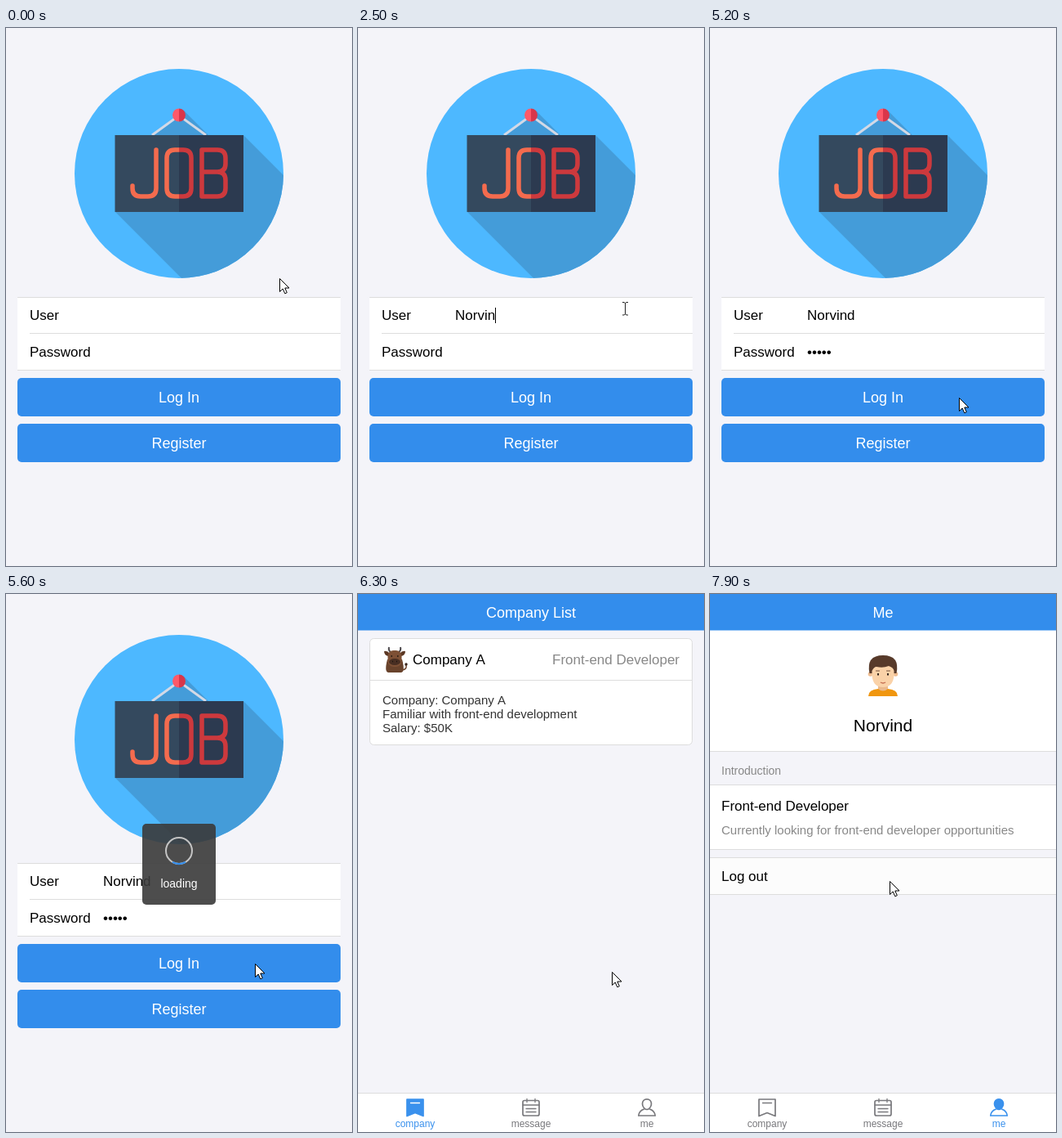
Write an HTML page that moves like this. It is 424 px wide and 658 px high and loops after 8 s.

```html
<!DOCTYPE html>
<html lang="en">
<head>
<meta charset="utf-8">
<title>Job app</title>
<style>
html, body { margin: 0; width: 100%; height: 100%; overflow: hidden; background: #f4f4f9; }
svg { display: block; width: 424px; height: 658px; font: 17px "Liberation Sans", Arial, sans-serif; font-kerning: none; }
.mid { text-anchor: middle; }
.end { text-anchor: end; }
.white { fill: #fff; }
.grey { fill: #888; }
.big { font-size: 18px; }
.body { font-size: 15px; }
.line { stroke: #ddd; fill: none; }
.blue { fill: #338dec; }
.tab { font-size: 12px; color: #78787c; }
.tab text { fill: currentColor; }
.tab path { stroke: currentColor; stroke-width: 1.7; fill: none; stroke-linejoin: round; stroke-linecap: round; }
.tab .thin { stroke-width: 1.3; }
.tab.on { color: #3a91ed; }
.tab.on .solid { fill: currentColor; }
.tab.on .mark { stroke: #fff; }
</style>
</head>
<body>
<svg viewBox="0 0 424 658">
  <defs>
    <clipPath id="disc"><circle cx="212" cy="178" r="128"/></clipPath>
  </defs>

  <g id="login">
    <g clip-path="url(#disc)">
      <rect x="84" y="50" width="256" height="256" fill="#4db8ff"/>
      <path fill="#449cd9" d="M291 131L350 190L300 320H229L134 225Z M218 101L248 131H181L212 109Z"/>
    </g>
    <path d="M179 131L212 107L245 131" fill="none" stroke="#d3d9e6" stroke-width="3"/>
    <rect x="133.500" y="131" width="157.500" height="94" fill="url(#board)"/>
    <circle cx="212" cy="106.500" r="8" fill="url(#pin)"/>
    <path fill="none" stroke="url(#ink)" stroke-width="5.500" stroke-linecap="round" stroke-linejoin="round"
      d="M184 149V196Q184 206 174 206H165Q155 206 155 196V193
         M207 149H217Q227 149 227 159V196Q227 206 217 206H207Q197 206 197 196V159Q197 149 207 149Z
         M240 176V149H259Q269 149 269 159V166Q269 176 259 176H240V206H259Q269 206 269 196V186Q269 176 259 176"/>
    <rect class="white" x="14" y="329" width="396" height="90"/>
    <path class="line" d="M14 329.500H410M29 373.500H410M14 418.500H410"/>
    <text x="29" y="357">User</text>
    <text x="29" y="402">Password</text>
    <text id="user" x="119" y="357"></text>
    <text id="pass" x="119" y="402"></text>
    <path id="caret" d="M.5 0V19" stroke="#000"/>
    <rect id="submit" class="blue" x="14" y="428" width="396" height="47" rx="5"/>
    <rect class="blue" x="14" y="484" width="396" height="47" rx="5"/>
    <text class="mid white big" x="212" y="458">Log In</text>
    <text class="mid white big" x="212" y="514">Register</text>
    <g id="toast">
      <rect x="167" y="281" width="90" height="99" rx="5" fill="#3a3a3a" opacity=".9"/>
      <circle cx="212" cy="314" r="16" fill="none" stroke="#c4c4c4" stroke-width="2"/>
      <path id="spin" d="M204 327.860A16 16 0 0 0 220 327.860" fill="none" stroke="#338dec" stroke-width="2.200"/>
      <text class="mid white" x="212" y="359" font-size="14">loading</text>
    </g>
  </g>

  <g id="company">
    <rect class="line" x="14.500" y="54.500" width="395" height="130" rx="5" style="fill:#fff"/>
    <path class="line" d="M15 105.500H409"/>
    <path d="M54 93Q61 92 58.500 86" fill="none" stroke="#6b432c" stroke-width="1.500"/>
    <circle cx="59" cy="86" r="1.700" fill="#38251b"/>
    <path d="M40 71Q37 69 38 65M50 71Q53 69 52 65" fill="none" stroke="#49464a" stroke-width="2"/>
    <path d="M32 70Q36 69 39 73L37 76Q32 75 32 70M58 70Q54 69 51 73L53 76Q58 75 58 70" fill="#5c3824"/>
    <path d="M36 80Q32 95 37 96H53Q58 95 54 80Z" fill="#69432c"/>
    <rect x="36.500" y="69" width="17" height="20" rx="7" fill="#7d5035"/>
    <ellipse cx="45" cy="83" rx="7" ry="4" fill="#482e22"/>
    <path d="M40.500 76h1.500M48 76h1.500M42 82.500h1M47 82.500h1" stroke="#17110d" stroke-width="1.500"/>
    <text x="67" y="86">Company A</text>
    <text class="end grey" x="394" y="86">Front-end Developer</text>
    <g class="body" fill="#333">
      <text x="30" y="135">Company: Company A</text>
      <text x="30" y="152">Familiar with front-end development</text>
      <text x="30" y="169">Salary: $50K</text>
    </g>
  </g>

  <g id="me">
    <path class="white" d="M0 44H424V192H0ZM0 233H424V312H0Z"/>
    <path fill="#fcfcfc" d="M0 322H424V367H0Z"/>
    <path class="line" d="M0 192.500H424M0 233.500H424M0 312.500H424M0 322.500H424M0 367.500H424"/>
    <path d="M194 125Q194 117 206 116H218Q230 117 230 125Z" fill="#f0960f"/>
    <path d="M206 108H218V116Q212 121 206 116Z" fill="#eab98c"/>
    <circle cx="196.500" cy="98" r="2.800" fill="#efbd91"/>
    <circle cx="227.500" cy="98" r="2.800" fill="#efbd91"/>
    <path d="M195.500 97Q191 75 212 75Q233 75 228.500 97Z" fill="#573a2a"/>
    <path d="M198.500 94Q201 89 204 89Q212 91 219 88Q225 90 225.500 94V100Q224 114 212 114Q200 114 198.500 100Z" fill="#fad2a8"/>
    <path d="M203 94h5M216 94h5" stroke="#7a5840"/>
    <path d="M206 97v2.500M218 97v2.500" stroke="#3a2920" stroke-width="2"/>
    <path d="M209 108Q212 110 215 108" fill="none" stroke="#c2694c" stroke-width="1.300"/>
    <text class="mid" x="212" y="168" font-size="21">Norvind</text>
    <text class="grey" x="14" y="221" font-size="14">Introduction</text>
    <text x="14" y="265">Front-end Developer</text>
    <text class="grey body" x="14" y="294">Currently looking for front-end developer opportunities</text>
    <text x="14" y="351">Log out</text>
  </g>

  <g id="frame">
    <rect class="blue" width="424" height="44.500"/>
    <text id="title" class="mid white big" x="212" y="29"></text>
    <rect class="white" y="610" width="424" height="48"/>
    <path class="line" d="M0 610.500H424"/>
    <g class="tab" id="tabCompany">
      <path class="solid" d="M60 618H80V638.500L70 634.500L60 638.500Z"/>
      <path class="mark thin" d="M64.500 622.500H75.500"/>
      <text class="mid" x="70" y="652">company</text>
    </g>
    <g class="tab">
      <path d="M204 619.500H220Q222 619.500 222 621.500V636Q222 638 220 638H204Q202 638 202 636V621.500Q202 619.500 204 619.500Z"/>
      <path class="thin" d="M202 625H222M207 617.500V621.500M217 617.500V621.500M206 629.500H218M206 633.500H218"/>
      <text class="mid" x="212" y="652">message</text>
    </g>
    <g class="tab" id="tabMe">
      <path class="solid" d="M354 617.800C357.500 617.800 359.500 620.500 359.500 623.500S357 630.500 354 630.500S348.500 626.500 348.500 623.500S350.500 617.800 354 617.800Z"/>
      <path d="M350.500 630Q344.500 632 343.800 638H364.200Q363.500 632 357.500 630"/>
      <text class="mid" x="354" y="652">me</text>
    </g>
  </g>

  <path id="arrow" d="M.5 .5V16.500L4.200 13L6.800 18.800L9.300 17.700L6.800 12H12Z" fill="#fff" stroke="#000"/>
  <path id="beam" d="M-3-7.500H-1L.5-6.500L2-7.500H4M.5-6.500V7M-3 8H-1L.5 7L2 8H4" fill="none" stroke="#222"/>
</svg>
<script>
const $ = id => document.getElementById(id);
const show = (id, on) => $(id).style.display = on ? "" : "none";

// Two-tone fills that switch colour on the sign's centre line
const split = (id, left, right) => `<linearGradient id="${id}" gradientUnits="userSpaceOnUse" x1="112" x2="312" y1="0" y2="0">
  <stop offset=".5" stop-color="${left}"/><stop offset=".5" stop-color="${right}"/></linearGradient>`;
document.querySelector("defs").innerHTML +=
  split("board", "#34495e", "#2c3a50") + split("pin", "#ff5969", "#d9364a") + split("ink", "#f46b4e", "#cd393d");

const LOOP = 8000, STEP = 100;
const FOCUS_USER = 900, FOCUS_PASS = 3100, PRESS = 5300, TOAST = 5450, LIST = 5800, ME = 6950;
const fields = {
  user: { text: "Norvind", keys: [1400, 1600, 1800, 2000, 2200, 2400, 2600], caretY: 342 },
  pass: { text: "•••••", keys: [3600, 3800, 4000, 4200, 4400], caretY: 387 }
};
// Pointer stops: time, x, y
const stops = [
  [0, 335, 306], [300, 404, 330], [800, 327, 343], [2700, 327, 343], [3100, 320, 391],
  [4600, 320, 391], [5000, 305, 452], [5900, 305, 452], [6200, 311, 462], [6400, 311, 462],
  [6850, 357, 627], [7250, 357, 627], [7800, 220, 351], [LOOP, 220, 351]
];

function pointer(t) {
  const i = stops.findIndex(s => s[0] > t);
  const [t0, x0, y0] = stops[i - 1], [t1, x1, y1] = stops[i];
  const k = (t - t0) / (t1 - t0), e = k * k * (3 - 2 * k);
  return [x0 + (x1 - x0) * e, y0 + (y1 - y0) * e];
}

// Slide in from the left while fading in, quartic ease-out
function enter(id, age) {
  const rest = (1 - Math.min(1, Math.max(0, age / 450))) ** 4;
  $(id).setAttribute("transform", `translate(${-20 * rest})`);
  $(id).setAttribute("opacity", 1 - rest);
}

function draw(t) {
  const login = t < LIST, me = t >= ME;
  show("login", login);
  show("company", !login && !me);
  show("me", me);
  show("frame", !login);

  for (const id in fields) {
    const { text, keys } = fields[id];
    $(id).textContent = text.slice(0, keys.filter(k => k <= t).length);
  }
  const active = t < FOCUS_PASS ? "user" : "pass";
  const { keys, caretY } = fields[active];
  const focus = active === "user" ? FOCUS_USER : FOCUS_PASS;
  const last = Math.max(focus, ...keys.filter(k => k <= t));
  show("caret", t >= focus && t < PRESS && (t - last) % 1000 < 500);
  if (login) {
    const x = 119 + Math.floor($(active).getComputedTextLength());
    $("caret").setAttribute("transform", `translate(${x} ${caretY})`);
  }

  $("submit").style.fill = t >= PRESS && t < PRESS + 150 ? "#2b79cc" : "";
  show("toast", t >= TOAST);
  $("toast").setAttribute("opacity", Math.min(1, (t - TOAST) / 150));
  $("spin").setAttribute("transform", `rotate(${(t - 5600) * .36} 212 314)`);

  enter("company", t - LIST);
  enter("me", t - ME);
  $("title").textContent = me ? "Me" : "Company List";
  $("tabCompany").classList.toggle("on", !me);
  $("tabMe").classList.toggle("on", me);

  const [x, y] = pointer(t).map(Math.round);
  const typing = login && x > 119 && x < 410 && y > 330 && y < 418;
  show("arrow", !typing);
  show("beam", typing);
  $(typing ? "beam" : "arrow").setAttribute("transform", `translate(${x} ${y})`);
}

const start = performance.now();
function tick() {
  const t = (performance.now() - start) % LOOP;
  draw(Math.floor(t / STEP) * STEP);
  requestAnimationFrame(tick);
}
tick();
</script>
</body>
</html>
```
